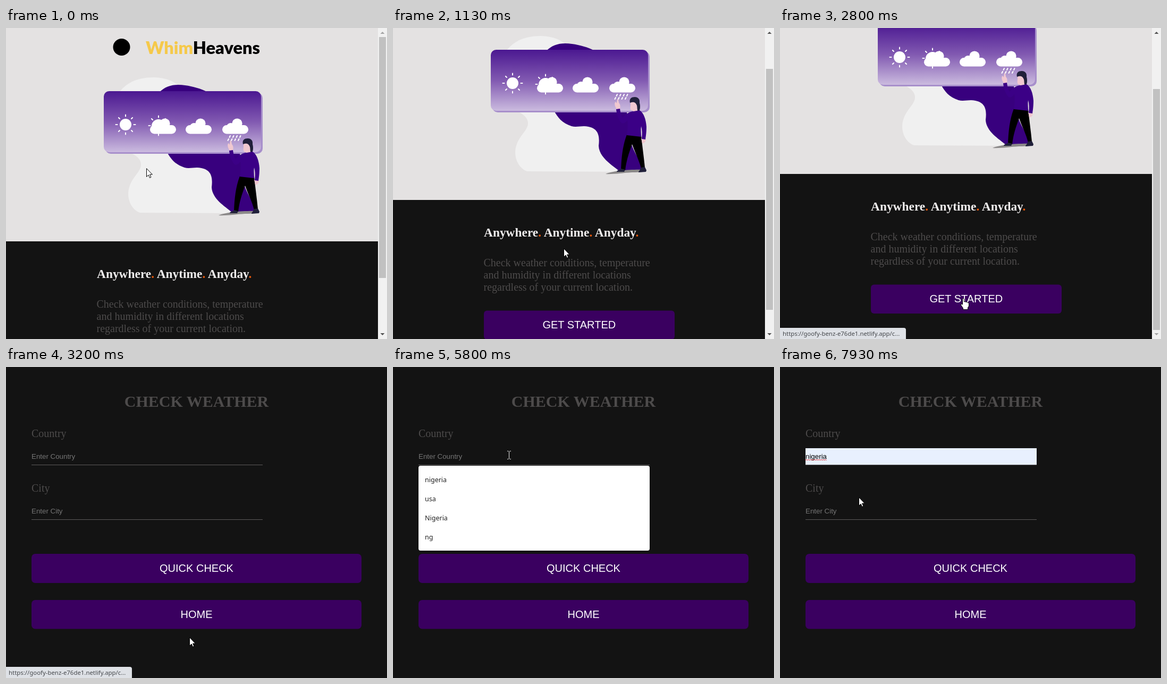
Animation of 717 by 586 pixels, one loop 8000 ms. Source, as an HTML page:

```html
<!DOCTYPE html>
<html lang="en">
<head>
<meta charset="utf-8">
<title>Weather check</title>
<style>
  html, body { margin: 0; width: 100%; height: 100%; overflow: hidden; background: #131313; }
  svg { display: block; width: 717px; height: 586px; }
  text { white-space: pre; }
  .serif { font-family: "Liberation Serif", "Times New Roman", serif; font-size: 20px; fill: #4d4b4b; }
  .bold { font-weight: 700; }
  .btn { font-family: "Liberation Sans", Arial, sans-serif; font-size: 20px; fill: #fff; text-anchor: middle; }
  .field { font-family: "Liberation Sans", Arial, sans-serif; font-size: 13.333px; fill: #757575; }
  .ui { font-family: "Noto Sans", sans-serif; font-size: 12.5px; fill: #222; }
  .logo { font-family: Lato, sans-serif; font-weight: 900; font-size: 32.5px; }
  .violet { fill: #3a0060; }
  .dot { fill: #e8590c; }
  #beam { mix-blend-mode: difference; }
</style>
</head>
<body>
<svg viewBox="0 0 717 586" xmlns="http://www.w3.org/2000/svg">
  <defs>
    <linearGradient id="sky" x1="0" y1="0" x2="0" y2="1">
      <stop offset="0" stop-color="#4b1891"/>
      <stop offset=".5" stop-color="#8159b1"/>
      <stop offset="1" stop-color="#cbbbdf"/>
    </linearGradient>
    <g id="cloud">
      <rect x="338" y="183" width="49" height="16.5" rx="8.2"/>
      <circle cx="366" cy="180" r="9.6"/>
      <circle cx="354" cy="187" r="8"/>
      <path d="M350 182h23l5 4v12h-30z"/>
    </g>
  </defs>

  <g id="home">
    <rect width="717" height="586" fill="#131313"/>
    <g id="page">
      <rect width="700" height="402" fill="#e4e2e2"/>
      <circle cx="217.5" cy="36" r="16"/>
      <text class="logo" x="263" y="49"><tspan fill="#f5c94b">Whim</tspan>Heavens</text>

      <path fill="#f0f0f0" d="M211 124C226 102 250 93 278 93C308 94 324 104 340 124L390 240L430 349L252 348C234 341 226 318 232 300C238 280 252 273 254 259C255 248 246 241 236 236Z"/>
      <path fill="#38007e" d="M288 122C300 108 318 105 337 108C352 110 366 114 380 121L440 236C444 262 446 282 449 298C455 315 466 328 470 345L425 347C412 336 388 322 387 300C389 284 388 268 368 264C356 261 346 266 336 263C318 257 310 247 302 232Z"/>
      <rect x="187" y="122" width="296" height="115" rx="10" fill="#a78fcb"/>
      <rect x="184" y="119" width="296" height="115" rx="10" fill="url(#sky)"/>

      <g fill="#fff" stroke="none">
        <circle cx="225" cy="182" r="11"/>
        <circle cx="287" cy="185" r="13"/>
        <use href="#cloud"/>
        <use href="#cloud" x="-67"/>
        <use href="#cloud" x="69"/>
      </g>
      <g id="rays" stroke="#fff" stroke-width="2" stroke-linecap="round"></g>

      <path fill="#8b8989" d="M400 353C415 347 445 344 476 345C476 349 465 350 450 350C430 351 415 354 400 353Z"/>
      <path d="M440 279L467 280C469 300 472 320 474 341L467 343C463 326 455 312 450 297C444 313 439 328 437 346L429 345C430 322 432 300 440 279Z"/>
      <path fill="#20203a" d="M429 343L437 345L435 349L421 349C421 346 427 346 429 343ZM466 341L474 340L477 346L476 349L462 350C462 347 466 346 466 341Z"/>
      <path fill="#f0c8d0" d="M467 286L476 287C476 292 473 296 469 295ZM421 231C417 225 416 219 419 217L421 220L422 212L424 213L425 219C428 222 428 226 427 231ZM447 214H459L463 232L462 239H451L452 234C447 234 446 230 447 225Z"/>
      <path fill="#20203a" d="M446 219C444 211 449 208 455 208C461 208 465 212 464 219C466 226 465 233 462 237C459 234 460 229 459 224C457 219 454 216 446 219Z"/>
      <path fill="#3b0086" d="M420 231L427 230C428 237 429 243 432 247C438 240 445 235 453 235L464 233C472 238 476 250 477 264C477 274 476 281 475 288L468 287C469 278 469 270 467 263C466 270 467 276 467 283L440 280C442 268 442 260 441 252C437 257 433 259 430 257C424 250 421 241 420 231Z"/>

      <text class="serif bold" x="171" y="471" style="font-size:23.4px;fill:#f0eeee">Anywhere<tspan class="dot">.</tspan> Anytime<tspan class="dot">.</tspan> Anyday<tspan class="dot">.</tspan></text>
      <text class="serif" x="170.5" y="527">Check weather conditions, temperature</text>
      <text class="serif" x="170.5" y="550">and humidity in different locations</text>
      <text class="serif" x="170.5" y="573">regardless of your current location.</text>
      <rect class="violet" x="171" y="610.5" width="359" height="54.5" rx="6"/>
      <text class="btn" x="350.3" y="644">GET STARTED</text>
    </g>
    <rect x="700" width="17" height="586" fill="#f1f1f1"/>
    <rect id="thumb" x="702" y="17" width="13" height="454" fill="#c1c1c1"/>
    <path id="up" d="M704.5 11h8l-4-4z"/>
    <path id="down" d="M704.5 575h8l-4 4z"/>
  </g>

  <g id="check">
    <rect width="717" height="586" fill="#131313"/>
    <text class="serif bold" x="358.5" y="75" text-anchor="middle" style="font-size:30px">CHECK WEATHER</text>
    <text class="serif" x="48" y="132">Country</text>
    <text class="serif" x="48" y="235">City</text>
    <rect id="fill" x="48" y="153" width="435" height="31" fill="#e8f0fe"/>
    <text id="country" class="field" x="48" y="173"></text>
    <text class="field" x="48" y="276">Enter City</text>
    <path d="M48 184.5h435M48 287.5h435" stroke="#5d5b5b"/>
    <path id="wave" fill="none" stroke="#e02020"/>
    <rect id="caret" y="161" width="1" height="15"/>
    <rect class="violet" x="48" y="352" width="621" height="55" rx="7"/>
    <text class="btn" x="358.5" y="386">QUICK CHECK</text>
    <rect class="violet" x="48" y="439" width="621" height="54.5" rx="7"/>
    <text class="btn" x="358.5" y="473">HOME</text>
    <g id="menu">
      <rect x="48" y="186" width="435" height="160" rx="4" fill="#fff"/>
      <rect id="pick" x="48" y="194" width="435" height="36" fill="#c8c8c8"/>
    </g>
  </g>

  <g id="status">
    <path d="M0 565h233q4 0 4 4v17H0z" fill="#dee1e6"/>
    <text class="ui" x="5" y="580" style="font-size:11.4px;fill:#44474b">https://goofy-benz-e76de1.netlify.app/c...</text>
  </g>

  <path id="arrow" d="M.5.7V16.3L4.1 12.9L6.5 18.3L8.9 17.2L6.6 12H11.4Z" fill="#fff" stroke="#000"/>
  <path id="beam" d="M-3 -7.5H-.5M1.5 -7.5H4M-3 7.5H-.5M1.5 7.5H4M.5 -7V7" fill="none" stroke="#fff"/>
  <path id="hand" d="M-1.5 12V1.5Q0 -.5 1.5 1.5V7Q3.5 5.5 4.5 7.5Q6.5 6.3 7.5 8.3Q10.5 7.5 10.5 10.5V15L8.5 18V21.5H-.5V19L-4.5 13Q-5 9.5 -1.5 12Z" fill="#fff" stroke="#000"/>
</svg>

<script>
const $ = id => document.getElementById(id);
const NS = "http://www.w3.org/2000/svg";
const TICKS = 120, TICK_RATE = 15 / 1000, LOOP = 8000;

function add(parent, tag, attrs, text) {
  const el = document.createElementNS(NS, tag);
  for (const k in attrs) el.setAttribute(k, attrs[k]);
  if (text) el.textContent = text;
  parent.append(el);
}

function line(x1, y1, x2, y2) {
  add($("rays"), "line", { x1, y1, x2, y2 });
}

function ray(cx, cy, turn) {
  const c = Math.cos(turn * Math.PI / 4), s = Math.sin(turn * Math.PI / 4);
  line(cx + 15.5 * c, cy + 15.5 * s, cx + 18.5 * c, cy + 18.5 * s);
}

for (let i = 0; i < 8; i++) ray(225, 182, i);
for (const i of [2, 4, 5, 6, 7]) ray(287, 184, i);
for (let i = 0; i < 4; i++) {
  line(422 + i * 6.5, 203, 420.5 + i * 6.5, 206);
  line(419 + i * 6.5, 209, 417.5 + i * 6.5, 212);
}

["nigeria", "usa", "Nigeria", "ng"].forEach((name, i) =>
  add($("menu"), "text", { class: "ui", x: 60, y: 217 + i * 36 }, name));

let wave = "M47.5 175.5";
for (let x = 49.5, i = 0; x < 89; x += 2, i++) wave += `L${x} ${i % 2 ? 175.5 : 174.5}`;
$("wave").setAttribute("d", wave);

// Rows are [tick, value, ...]
const pointer = [
  [1, 264, 264], [3, 296, 352], [5, 321, 415], [29, 321, 415], [30, 331, 453],
  [34, 339, 488], [38, 345, 509], [62, 345, 509], [65, 290, 300], [68, 226, 136],
  [70, 222, 152], [74, 218, 166], [94, 218, 166], [97, 203, 195], [100, 193, 202],
  [114, 193, 202], [119, 148, 245]
];
const scroll = [[13, 0], [14, 5], [15, 25], [17, 78], [18, 108], [19, 127]];
const statusFade = [[40, 0], [42, 1], [52, 1], [56, 0]];

function at(rows, t) {
  const i = rows.findIndex(r => r[0] > t);
  if (i === 0) return rows[0].slice(1);
  if (i < 0) return rows[rows.length - 1].slice(1);
  const a = rows[i - 1], b = rows[i], k = (t - a[0]) / (b[0] - a[0]);
  return a.slice(1).map((v, j) => v + (b[j + 1] - v) * k);
}

const within = (v, lo, hi) => v >= lo && v < hi;
const show = (id, on) => { $(id).style.display = on ? "" : "none"; };

function pointerShape(t, y) {
  if (t < 30) return "arrow";
  if (t < 48) return y >= 484 ? "hand" : y < 460 ? "beam" : "arrow";
  if (within(y, 153, 185)) return "beam";
  return within(y, 352, 407) || within(y, 439, 494) ? "hand" : "arrow";
}

function draw(t) {
  const top = Math.round(at(scroll, t)[0]);
  show("home", t < 48);
  show("check", t >= 48);
  $("page").setAttribute("transform", `translate(0 ${-top})`);
  $("thumb").setAttribute("y", 17 + Math.round(top * 0.774));
  $("up").setAttribute("fill", top > 0 ? "#505050" : "#a3a3a3");
  $("down").setAttribute("fill", top < 127 ? "#505050" : "#a3a3a3");
  $("status").setAttribute("opacity", at(statusFade, t)[0]);

  const filled = t >= 97, chosen = t >= 108;
  show("fill", filled);
  show("menu", within(t, 80, 108));
  show("pick", filled);
  show("wave", t >= 111);
  $("country").textContent = filled ? "nigeria" : "Enter Country";
  $("country").style.fill = filled ? "#000" : "";
  show("caret", within(t, 79, 87) || within(t, 95, 103) || within(t, 108, 116));
  $("caret").setAttribute("x", chosen ? 88 : 48);
  $("caret").setAttribute("fill", filled ? "#000" : "#ccc");

  const [x, y] = at(pointer, t).map(Math.round);
  const shape = pointerShape(t, y);
  for (const id of ["arrow", "beam", "hand"]) show(id, id === shape);
  $(shape).setAttribute("transform", `translate(${x} ${y})`);
}

const start = performance.now();
function frame() {
  const ms = (performance.now() - start) % LOOP;
  draw(Math.floor((ms + 5) * TICK_RATE) % TICKS);
  requestAnimationFrame(frame);
}
frame();
</script>
</body>
</html>
```
